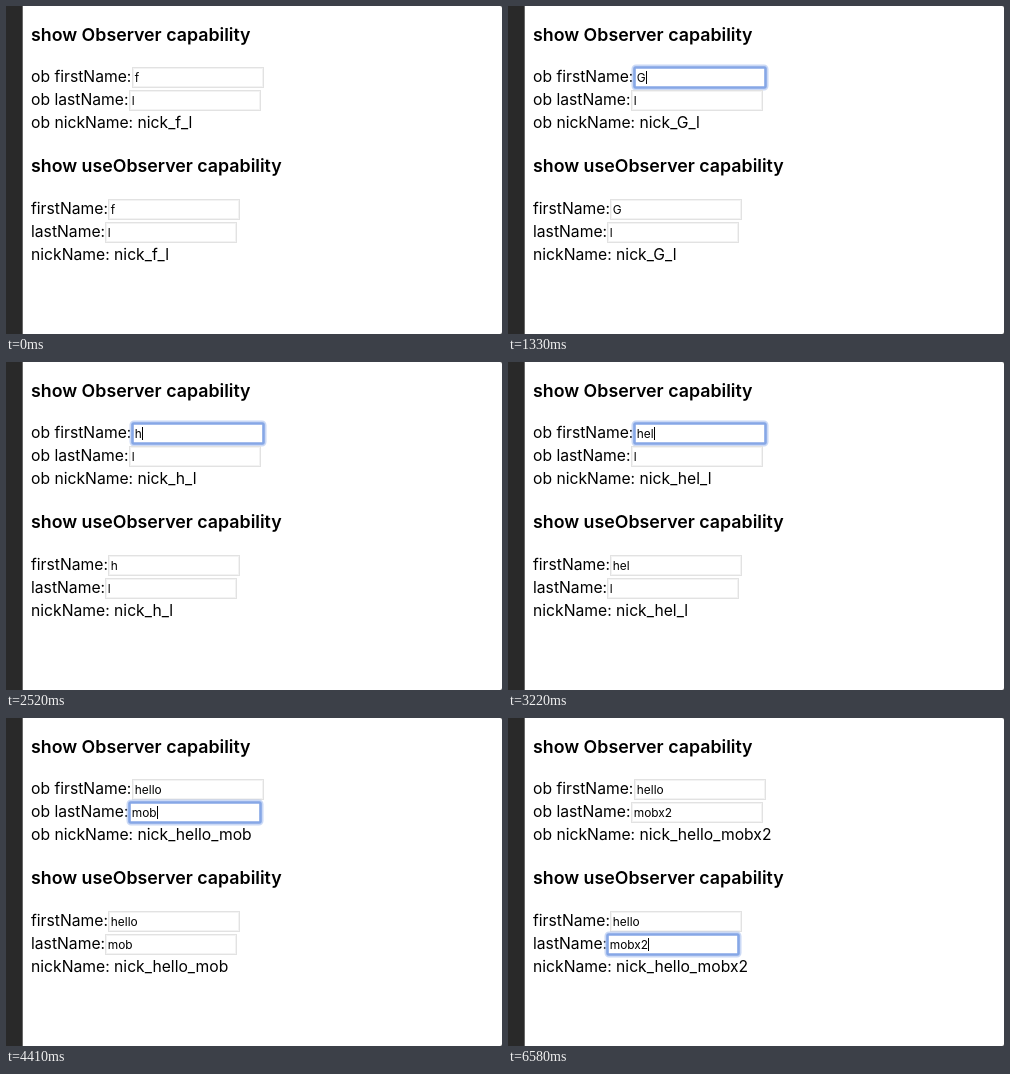
Recreate the animation shown at these times as an HTML page. Size 496 by 328 pixels, loop 6720 ms.

```html
<!DOCTYPE html>
<html lang="en">
<head>
<meta charset="utf-8">
<title>Observer form</title>
<style>
  html, body { margin: 0; width: 100%; height: 100%; overflow: hidden; background: #fff; }
  svg { display: block; width: 496px; height: 328px; }
  text { white-space: pre; fill: #000; }
  .label { font: 15.7px Inter, "Open Sans", sans-serif; }
  .head { font: 600 17.8px Inter, "Open Sans", sans-serif; }
  .value { font: 11.9px Inter, Roboto, sans-serif; }
  .field { fill: #fff; stroke: #e2e2e2; }
  .inner { fill: none; stroke: #f3f3f3; }
  .glow { fill: none; stroke: #a9c0ee; stroke-width: 5; stroke-opacity: .6; }
  .ring { fill: #fff; stroke: #86a7e6; stroke-width: 2.6; }
  .select { fill: #b5d5fd; }
  .squiggle { stroke: #e5483f; stroke-width: 1.6; stroke-linecap: round; stroke-dasharray: 0 2.8; }
</style>
</head>
<body>
<svg id="stage" viewBox="0 0 496 328">
  <rect width="496" height="328" fill="#fff"/>
  <rect width="16.7" height="328" fill="#292929"/>
  <path d="M494 0h2v2q0-2-2-2zM496 326v2h-2q2 0 2-2z" fill="#555"/>
</svg>
<script>
const LOOP = 6720;
const stage = document.getElementById('stage');

// time, first name, last name, focused field, cursor mode
const STEPS = [
  [0, 'f', 'l', -1, ''],
  [770, 'f', 'l', 0, 'select'],
  [1330, 'G', 'l', 0, 'caret'],
  [1680, 'Go', 'l', 0, 'caret'],
  [2030, 'G', 'l', 0, 'caret'],
  [2170, '', 'l', 0, 'caret'],
  [2520, 'h', 'l', 0, 'caret'],
  [2940, 'he', 'l', 0, 'caret'],
  [3220, 'hel', 'l', 0, 'caret'],
  [3360, 'hell', 'l', 0, 'caret'],
  [3500, 'hello', 'l', 0, 'caret'],
  [3640, 'hello', 'l', 1, 'select'],
  [4130, 'hello', 'm', 1, 'caret'],
  [4270, 'hello', 'mo', 1, 'caret'],
  [4410, 'hello', 'mob', 1, 'caret'],
  [4620, 'hello', 'mobx', 1, 'caret'],
  [5180, 'hello', 'mobx', 1, ''],
  [5670, 'hello', 'mobx', 1, 'caret'],
  [5740, 'hello', 'mobx', 1, 'caret spell'],
  [6090, 'hello', 'mobx', 3, 'caret'],
  [6580, 'hello', 'mobx2', 3, 'caret'],
];

function add(tag, attrs, content = '') {
  const node = document.createElementNS('http://www.w3.org/2000/svg', tag);
  for (const key in attrs) node.setAttribute(key, attrs[key]);
  node.textContent = content;
  stage.append(node);
  return node;
}

const write = (cls, x, y, content) => add('text', { class: cls, x, y }, content);
const box = (cls, x, y, width, height, rx = 0) =>
  add('rect', { class: cls, x, y, width, height, rx });
const show = (node, on) => node.setAttribute('visibility', on ? 'visible' : 'hidden');

function makeField(x, baseline) {
  const top = baseline - 15;
  const left = x + 2.8;
  box('field', x + .5, top + .5, 131, 20);
  box('inner', x + 1.5, top + 1.5, 129, 18);
  const focus = [
    box('glow', x, top, 132, 21, 2),
    box('ring', x + .5, top + .5, 131, 20, 1),
  ];
  const select = box('select', left, baseline - 11, 0, 13);
  const value = write('value', left, baseline - .5, '');
  const caret = box('caret', left, baseline - 11, 1, 13);
  const squiggle = add('line', { class: 'squiggle', x1: left, y1: baseline + 2.2, y2: baseline + 2.2 });

  return (content, focused, mode) => {
    value.textContent = content;
    const width = content ? value.getComputedTextLength() : 0;
    select.setAttribute('width', width);
    caret.setAttribute('x', Math.round(left + width + .3));
    squiggle.setAttribute('x2', left + width);
    focus.forEach(node => show(node, focused));
    show(select, focused && mode.includes('select'));
    show(caret, focused && mode.includes('caret'));
    show(squiggle, focused && mode.includes('spell'));
  };
}

write('head', 25, 35, 'show Observer capability');
write('label', 25, 76, 'ob firstName:');
write('label', 25, 99, 'ob lastName:');
write('head', 25, 166, 'show useObserver capability');
write('label', 25, 208, 'firstName:');
write('label', 25, 231, 'lastName:');

const fields = [[126, 76], [123, 99], [102, 208], [99, 231]].map(p => makeField(...p));
const nicks = [['ob nickName: ', 122], ['nickName: ', 254]]
  .map(([label, y]) => ({ label, node: write('label', 25, y, label) }));

let current;
function draw(now) {
  const time = now % LOOP;
  const step = STEPS.findLast(s => s[0] <= time);
  if (step !== current) {
    current = step;
    const [, first, last, focus, mode] = step;
    fields.forEach((set, i) => set(i % 2 ? last : first, i === focus, mode));
    nicks.forEach(n => { n.node.textContent = `${n.label}nick_${first}_${last}`; });
  }
}

const start = performance.now();
function tick() {
  draw(performance.now() - start);
  requestAnimationFrame(tick);
}
tick();
</script>
</body>
</html>
```
